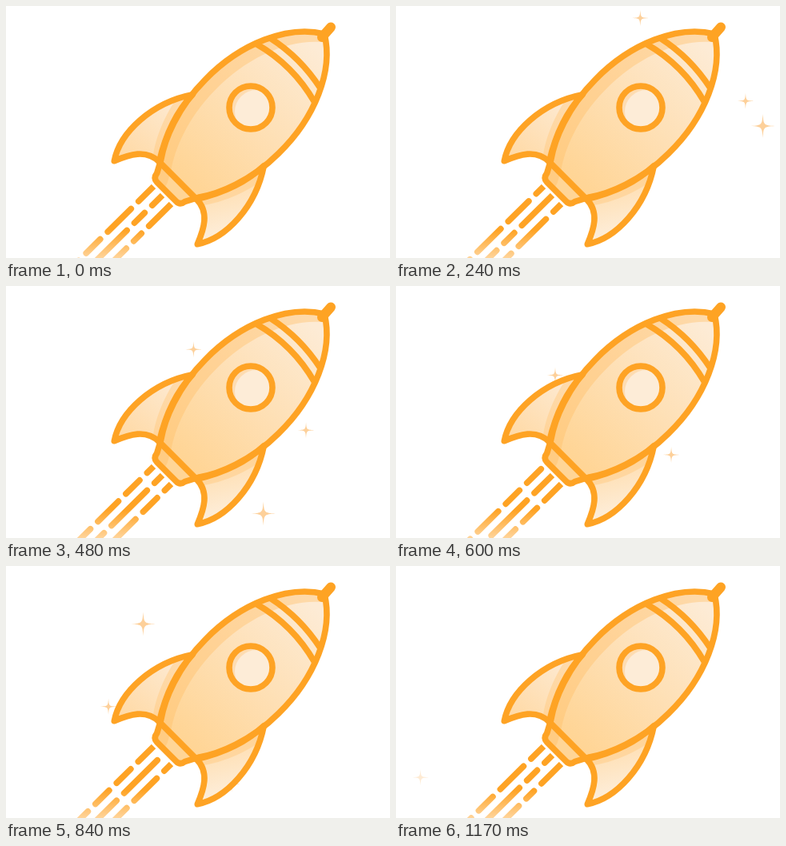
Recreate the animation shown at these times as an HTML page with a canvas. Size 480 by 315 pixels, loop 1.2 s.

```html
<!DOCTYPE html>
<html lang="en">
<head>
<meta charset="utf-8">
<title>Rocket</title>
<style>
  html, body { margin: 0; width: 100%; height: 100%; overflow: hidden; background: #fff; }
  canvas { display: block; width: 480px; height: 315px; }
</style>
</head>
<body>
<canvas id="stage" width="480" height="315"></canvas>
<script>
const ctx = document.getElementById('stage').getContext('2d');
const LOOP = 1200, STEP = 30;
const ORANGE = '#fea324', STAR = '#fdd09a';
const LINE = 7.6, DASH_PERIOD = 127, HALF_GAP = 4.7;
const clamp = v => Math.max(0, Math.min(1, v));

// Stars: position at time `at`, velocity in px/ms, visible span and fades
const stars = [
  { at: 600, x: 199, y: 111.5, vx: -0.2955, vy: 0.268, r: 10, from: 0, to: 1200, fadeOut: 70 },
  { at: 360, x: 406, y: 149.5, vx: -0.258, vy: 0.256, r: 10, from: 0, to: 1100 },
  { at: 240, x: 458.5, y: 150, vx: -0.57, vy: 0.56, r: 15, from: 0, to: 600 },
  { at: 840, x: 171.5, y: 72.5, vx: -0.57, vy: 0.56, r: 15, from: 735, to: 1100, fadeIn: 50, fadeOut: 50 }
];

// Exhaust lanes: start point and x of the gap centres at time 0
const lanes = [
  { x: 182, y: 228, gaps: [122.5, 161, 196, 222.5] },
  { x: 194, y: 238, gaps: [155.8, 178, 231.8] },
  { x: 205, y: 249, gaps: [155, 174, 217.5, 244.5] }
];

function gradient(x0, y0, x1, y1, ...colors) {
  const g = ctx.createLinearGradient(x0, y0, x1, y1);
  colors.forEach((c, i) => g.addColorStop(i / (colors.length - 1), c));
  return g;
}

// Rocket shapes use axis coordinates: a runs from nose to nozzle, b across
const R = Math.SQRT1_2;
const axis = new DOMMatrix([-R, R, R, R, 398, 35]);
function shape(d, shiftB = 0) {
  const p = new Path2D();
  p.addPath(new Path2D(d), axis.translate(0, shiftB));
  return p;
}

const BODY = 'M0 0C24 -40 82 -66 146 -65C195 -65 235 -48 256 -33L271 -25' +
  'Q279 -24 279 -17L279 17Q279 24 271 25L256 33C235 48 195 65 146 65C82 66 24 40 0 0Z';
const body = shape(BODY);
const bodyLit = shape(BODY, 18);
const shadowLeft = shape(BODY, -13), shadowRight = shape(BODY, 13);
const nose = shape('M51.5 -44Q42 0 51.5 44');
const collar = shape('M69 -51.5Q55 0 69 51.5');
const base = shape('M259 -33L259 33');
const finLeft = shape('M170 -63C213 -92 268 -94 298 -73.5C279 -66 259 -56 259 -33C235 -48 205 -62 170 -63Z');
const finRight = shape('M170 63C213 92 268 94 298 73.5C279 66 259 56 259 33C235 48 205 62 170 63Z');
const everything = new Path2D('M0 0H480V315H0Z');

function fillInside(clipPath, path, color, rule = 'nonzero') {
  ctx.save();
  ctx.clip(clipPath);
  ctx.fillStyle = color;
  ctx.fill(path, rule);
  ctx.restore();
}

function circle(x, y, r) {
  const p = new Path2D();
  p.arc(x, y, r, 0, Math.PI * 2);
  return p;
}

function drawStar(s, t) {
  if (t < s.from || t > s.to) return;
  const fadeIn = s.fadeIn ? clamp((t - s.from) / s.fadeIn) : 1;
  const fadeOut = s.fadeOut ? clamp((s.to - t) / s.fadeOut) : 1;
  const k = s.r * 0.07;
  ctx.save();
  ctx.globalAlpha = fadeIn * fadeOut;
  ctx.translate(s.x + s.vx * (t - s.at), s.y + s.vy * (t - s.at));
  ctx.beginPath();
  ctx.moveTo(0, -s.r);
  ctx.bezierCurveTo(k, -k, k, -k, s.r, 0);
  ctx.bezierCurveTo(k, k, k, k, 0, s.r);
  ctx.bezierCurveTo(-k, k, -k, k, -s.r, 0);
  ctx.bezierCurveTo(-k, -k, -k, -k, 0, -s.r);
  ctx.fillStyle = STAR;
  ctx.fill();
  ctx.restore();
}

function drawExhaust(t) {
  ctx.save();
  ctx.clip(new Path2D('M0 41L274 315H0Z'));
  ctx.strokeStyle = gradient(0, 280, 0, 328, ORANGE, '#ffe6c6');
  ctx.lineWidth = LINE;
  ctx.lineCap = 'round';
  ctx.beginPath();
  for (const { x, y, gaps } of lanes) {
    gaps.forEach((gap, i) => {
      const next = i + 1 < gaps.length ? gaps[i + 1] : gaps[0] + DASH_PERIOD;
      for (let k = -1; k <= 1; k++) {
        const shift = (k - t / LOOP) * DASH_PERIOD;
        const low = gap + HALF_GAP + shift, high = next - HALF_GAP + shift;
        if (high < 80 || low > x + 6) continue;
        ctx.moveTo(low, y + (x - low) * 0.99);
        ctx.lineTo(high, y + (x - high) * 0.99);
      }
    });
  }
  ctx.stroke();
  ctx.restore();
}

function drawRocket() {
  ctx.fillStyle = gradient(225, 120, 155, 200, '#fdebd5', '#ffd9a4');
  ctx.fill(finLeft);
  fillInside(finLeft, shadowLeft, 'rgba(254,200,125,0.45)');
  ctx.fillStyle = gradient(270, 225, 285, 285, '#ffdeb0', '#fdeedb');
  ctx.fill(finRight);
  fillInside(finRight, shadowRight, 'rgba(254,200,125,0.45)');

  ctx.fillStyle = gradient(225, 215, 385, 50, '#ffd596', '#fee0b6', '#fdebd5');
  ctx.fill(body);
  const unlit = new Path2D(everything);
  unlit.addPath(bodyLit);
  fillInside(body, unlit, 'rgba(254,190,105,0.42)', 'evenodd');

  const pane = circle(306, 127, 27);
  ctx.fillStyle = '#fddcb2';
  ctx.fill(pane);
  fillInside(pane, circle(313, 132, 27), '#fdecd7');

  ctx.strokeStyle = ORANGE;
  ctx.lineWidth = LINE;
  ctx.lineJoin = 'round';
  ctx.lineCap = 'round';
  for (const path of [finLeft, finRight, body, nose, collar, base, pane]) ctx.stroke(path);

  ctx.lineWidth = 12;
  ctx.stroke(new Path2D('M395 39L406 26.5'));
}

function frame(now) {
  const t = Math.floor((now % LOOP) / STEP) * STEP;
  ctx.fillStyle = '#fff';
  ctx.fillRect(0, 0, 480, 315);
  stars.forEach(s => drawStar(s, t));
  drawExhaust(t);
  drawRocket();
}

let start;
function tick(now) {
  start ??= now;
  frame(Math.max(0, now - start));
  requestAnimationFrame(tick);
}
frame(0);
requestAnimationFrame(tick);
</script>
</body>
</html>
```
